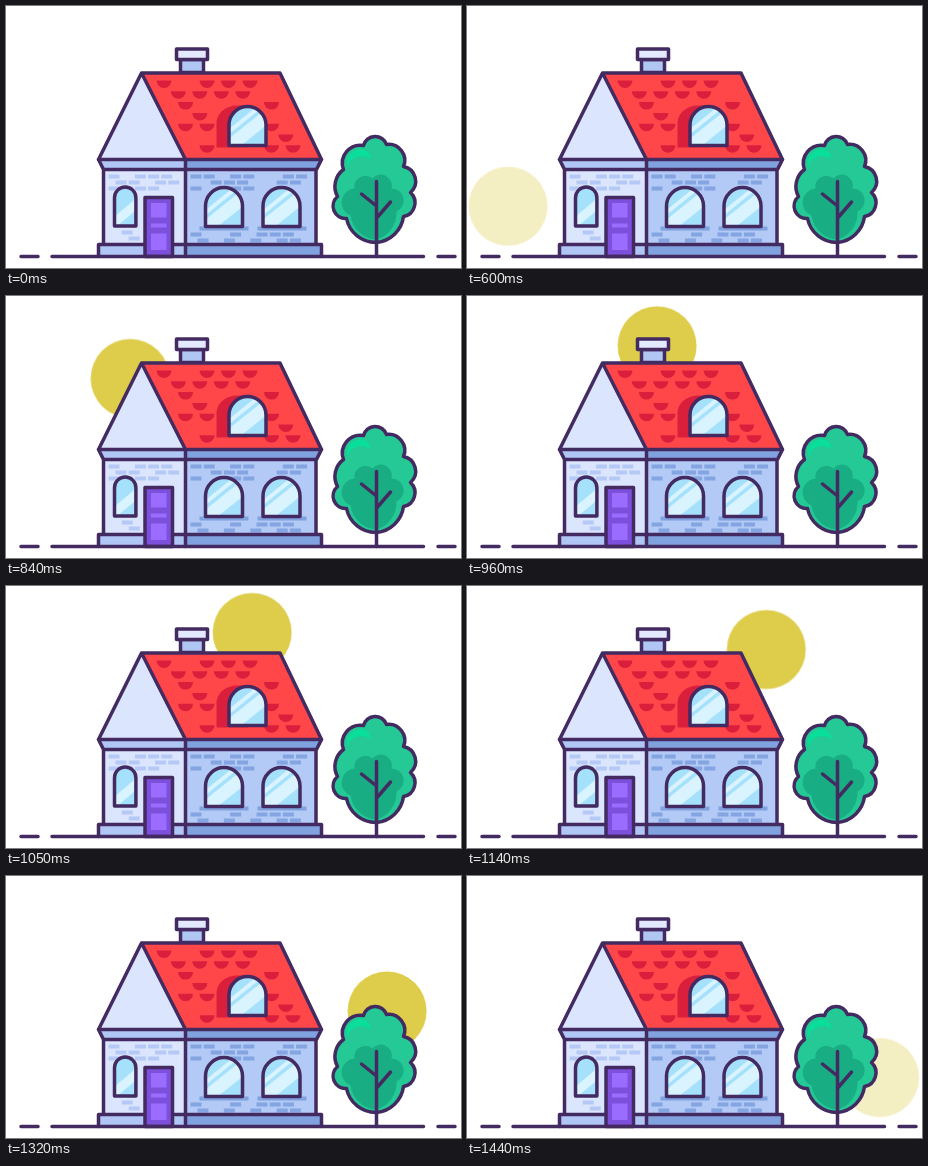
Recreate the animation shown at these times as an HTML page. Size 455 px wide and 262 px high, loop 1.47 s.

```html
<!DOCTYPE html>
<html lang="en">
<head>
<meta charset="utf-8">
<title>House and sun</title>
<style>
  html, body { margin: 0; width: 100%; height: 100%; overflow: hidden; background: #fff; }
  svg { display: block; width: 100vw; height: 100vh; }
  .ink { stroke: #432b62; stroke-width: 3.5; stroke-linejoin: round; stroke-linecap: round; }
  .line { fill: none; }
</style>
</head>
<body>
<svg viewBox="0 0 455 262" preserveAspectRatio="none">
  <defs>
    <path id="tile" d="M-7.5 0H7.5A7.5 7.5 0 0 1-7.5 0Z" fill="#d91f3c"/>
    <path id="wide" d="M0 39V18.5a18.5 18.5 0 0 1 37 0V39Z"/>
    <path id="slim" d="M0 39V10.7a10.7 10.7 0 0 1 21.4 0V39Z"/>
    <clipPath id="wideClip"><use href="#wide"/></clipPath>
    <clipPath id="slimClip"><use href="#slim"/></clipPath>
    <g id="window">
      <use href="#wide" fill="#a6e1fc"/>
      <g stroke="#d9f4ff" clip-path="url(#wideClip)">
        <path d="M-6 30L36-4" stroke-width="4"/>
        <path d="M-2 42L48 2" stroke-width="13"/>
      </g>
      <use href="#wide" class="ink line"/>
    </g>
  </defs>

  <circle id="sun" r="39.5" fill="#decc4b" opacity="0"/>

  <g transform="translate(.5 .5)">
    <g id="tree">
      <path class="ink" fill="#24c996" d="M357 139A12 12 0 0 1 380 138A16 16 0 0 1 397 160A15 15 0 0 1 404 186A14 14 0 0 1 397 210A30 30 0 0 1 370 236A30 30 0 0 1 340 212A12.500 12.500 0 0 1 331 190A21 21 0 0 1 337 163A18 18 0 0 1 357 139Z"/>
      <path fill="#08df9b" d="M341 161A14 14 0 0 1 357 143A10 10 0 0 1 364 153A14 14 0 0 0 341 161Z"/>
      <path fill="#19ad84" d="M348 182A11 11 0 0 1 366 172A11 11 0 0 1 385 182A12 12 0 0 1 390 205A28 28 0 0 1 370 233A28 28 0 0 1 344 209A14 14 0 0 1 348 182Z"/>
      <path class="ink line" d="M370 175V250M355 187.500L370 199.500M384 195.500L371 210.500"/>
    </g>

    <g id="chimney" class="ink">
      <path fill="#b0c7f4" d="M174 53H197V66H174Z"/>
      <path fill="#e3e9ff" d="M170 42.500H201V53H170Z"/>
    </g>

    <g id="walls">
      <path fill="#dbe5fe" d="M97 162H179V239H97Z"/>
      <path fill="#b2caf5" d="M179 162H309.500V239H179Z"/>
      <g id="bricks"></g>
      <path fill="#b0c6f5" d="M92 153H179V163H97ZM92 238H179V250H92Z"/>
      <path fill="#80a2de" d="M179 153H315L310 163H179ZM179 238H315V250H179ZM193 220H242V224H193ZM251 220H300V224H251Z"/>
      <path class="ink line" d="M92 153L97 163H310L315 153M97 163V238M309.500 163V238M179 153V250M92 250V238H315V250"/>
    </g>

    <g id="roof">
      <path fill="#ff474a" d="M135 66.500H273.500L315 153H179Z"/>
      <path fill="#dbe5fe" d="M135 66.500L92 153H179Z"/>
      <g id="tiles"></g>
      <path fill="#d91f3c" d="M210 141V117C210 106 220 99 231 99H242V141Z"/>
      <path class="ink line" d="M135 66.500H273.500L315 153H92ZL179 153"/>
    </g>

    <use href="#window" x="222.500" y="100"/>
    <use href="#window" x="199" y="181"/>
    <use href="#window" x="256.500" y="181"/>
    <g transform="translate(108 180.500)">
      <use href="#slim" fill="#a6e1fc"/>
      <path clip-path="url(#slimClip)" stroke="#d9f4ff" stroke-width="9" d="M-2 37L28 12"/>
      <use href="#slim" class="ink line"/>
    </g>

    <g id="door">
      <path class="ink" fill="#7d50dc" d="M138.500 250V191H166V250Z"/>
      <path fill="#9a6cff" d="M144.500 196.500H160V211H144.500ZM144.500 217H160V221H144.500ZM144.500 227H160V243.500H144.500Z"/>
    </g>
    <path class="ink line" d="M14.500 250H31.500M45.500 250H417M431.500 250H448.500"/>
  </g>
</svg>
<script>
  const NS = 'http://www.w3.org/2000/svg';
  const byId = id => document.getElementById(id);

  function add(parent, tag, attrs) {
    const el = document.createElementNS(NS, tag);
    for (const key in attrs) el.setAttribute(key, attrs[key]);
    byId(parent).append(el);
  }

  // Staggered roof tiles, kept clear of the sloping edges and the dormer
  function tileRoof() {
    for (let row = 0; row < 7; row++) {
      const y = 74 + row * 10.8;
      const left = 135 + (y - 66) * 0.51 + 12;
      const right = 273 + (y - 66) * 0.48 - 12;
      for (let k = 0; k < 7; k++) {
        const x = 157.5 + k * 21.5 + (row % 2) * 14.3;
        const dormer = y > 90 && x > 208 && x < 265;
        const gap = (row * 2 + k) % 5 === 1;
        if (x > left && x < right && !dormer && !gap) add('tiles', 'use', { href: '#tile', x, y });
      }
    }
  }

  // Staggered courses with some bricks missing at random
  function layBricks(from, to, y, courses, fill, seed) {
    const random = () => (seed = (seed * 16807) % 2147483647) / 2147483647;
    for (let row = 0; row < courses; row++)
      for (let x = from + (row % 2) * 7; x + 11 <= to; x += 13.2)
        if (random() < 0.65) add('bricks', 'rect', { x, y: y + row * 6, width: 11, height: 4, fill });
  }

  tileRoof();
  layBricks(102, 175, 168, 3, '#b5c9f6', 4021);
  layBricks(102, 135, 224, 2, '#b5c9f6', 91733);
  layBricks(184, 306, 168, 3, '#84a5e1', 52817);
  layBricks(184, 306, 226, 2, '#84a5e1', 77003);

  // The sun swings at constant speed round a slightly squared arc
  const LOOP = 1470, STEP = 30, RISE = 600, LAST = 28;

  function sunAt(k) {
    const angle = (10.6 + 159.2 * k) * Math.PI / 180;
    const radius = 186.3 + 3.5 * Math.cos(4 * angle);
    return [226.7 - radius * Math.cos(angle), 235 - radius * Math.sin(angle)];
  }

  const hold = 'steps(1, end)';
  const hidden = { opacity: 0, transform: 'translate(0px, 0px)', easing: hold };
  const steps = [{ ...hidden, offset: 0 }];
  for (let n = 0; n <= LAST; n++) {
    const [x, y] = sunAt(n / LAST);
    steps.push({
      offset: (RISE + n * STEP) / LOOP,
      opacity: Math.min(1, (n + 1) / 3, (LAST - n + 1) / 3),
      transform: `translate(${x.toFixed(2)}px, ${y.toFixed(2)}px)`,
      easing: hold
    });
  }
  steps.push({ ...hidden, offset: 1 });
  byId('sun').animate(steps, { duration: LOOP, iterations: Infinity });
</script>
</body>
</html>
```
